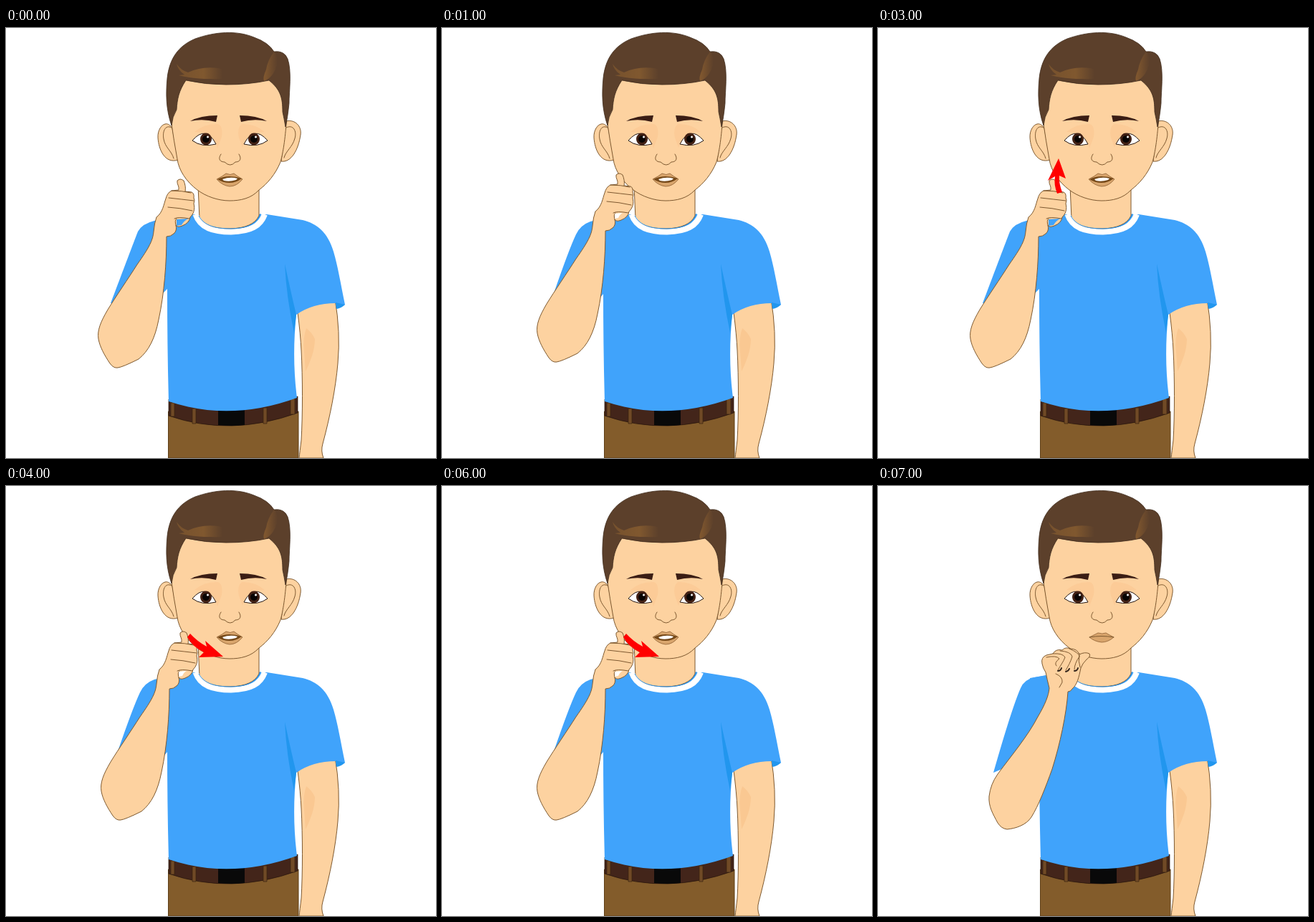
Animation, 600 px wide and 600 px high, one loop 8 s. Source, as an HTML page:

```html
<!DOCTYPE html>
<html lang="en">
<head>
<meta charset="utf-8">
<title>Sign gesture</title>
<style>
html, body { margin: 0; width: 100%; height: 100%; overflow: hidden; background: #fff; }
svg { display: block; width: 100vw; height: 100vh; }
.skin { fill: #fdd2a0; stroke: #7d5930; stroke-width: 1; stroke-linejoin: round; }
.line { fill: none; stroke: #7d5930; stroke-width: 1; stroke-linecap: round; }
.shirt { fill: #40a3fb; }
.shade { fill: #2196ee; }
.lip { fill: #d9a56c; stroke: #8d5f31; stroke-width: .8; }
.mark { fill: #f00; font: 19px "Noto Sans", "Open Sans", sans-serif; text-anchor: middle; }
.step { opacity: 0; animation: 8s step-end infinite; }
.high { animation-name: high; }
.mid { animation-name: mid; }
.chin { animation-name: chin; }
.one { animation-name: one; }
.up { animation-name: up; }
.back { animation-name: back; }
.two { animation-name: two; }
@keyframes high { 0%, 37.5% { opacity: 1 } 12.5%, 50%, 100% { opacity: 0 } }
@keyframes mid { 12.5%, 50%, 75% { opacity: 1 } 0%, 25%, 62.5%, 87.5%, 100% { opacity: 0 } }
@keyframes chin { 25%, 62.5%, 87.5%, 100% { opacity: 1 } 0%, 37.5%, 75% { opacity: 0 } }
@keyframes one { 25% { opacity: 1 } 0%, 37.5%, 100% { opacity: 0 } }
@keyframes up { 37.5% { opacity: 1 } 0%, 50%, 100% { opacity: 0 } }
@keyframes back { 50%, 75% { opacity: 1 } 0%, 62.5%, 87.5%, 100% { opacity: 0 } }
@keyframes two { 62.5% { opacity: 1 } 0%, 75%, 100% { opacity: 0 } }
</style>
</head>
<body>
<svg viewBox="0 0 600 600">
  <defs>
    <linearGradient id="shine" x1="0" x2="1">
      <stop offset="0" stop-color="#83592f"/><stop offset="1" stop-color="#5c402b"/>
    </linearGradient>
    <linearGradient id="tuft" x1="0" x2="1">
      <stop offset="0" stop-color="#76512d"/><stop offset=".35" stop-color="#80582f"/><stop offset=".6" stop-color="#5c402b"/>
    </linearGradient>

    <g id="openMouth">
      <path class="lip" d="M294 211Q302 207 307 203Q313 206 318 203Q323 207 330 211Q322 221 312 221Q302 220 294 211Z"/>
      <path fill="#754919" d="M295 211Q303 207 312 207Q321 207 329 210Q321 216 312 216Q302 216 295 211Z"/>
      <path fill="#fff" d="M302 211Q313 207 323 210L321 212Q312 215 304 213Z"/>
    </g>

    <g id="raisedArm">
      <path class="skin" d="M210 264C219 257 220 246 223 238Q225 230 231 227L241 226C242 220 238 218 239 213Q243 209 248 213C250 218 251 223 250 228L259 229Q263 231 262 237Q264 240 262 245C264 253 262 259 257 264Q256 272 246 276Q239 279 237 275Q239 283 234 287Q230 291 224 291C224 327 221 370 213 407C208 433 199 451 185 462Q163 473 156 474Q150 475 145 468C137 456 131 445 129 434C127 422 132 410 142 393C153 375 171 349 183 330C200 306 205 296 206 284Q207 272 210 264Z"/>
      <path class="line" d="M231 227Q246 227 258 230M227 237Q245 239 262 241M226 250Q243 251 260 255M235 266Q240 263 256 266M237 275Q235 268 238 266"/>
    </g>

    <g id="eye">
      <path id="eyeWhite" fill="#fff" stroke="#25150e" d="M260 157Q279 135 293 162Q273 167 260 157Z"/>
      <ellipse cx="279" cy="155" rx="8" ry="8.500" fill="#412014"/>
      <circle cx="279" cy="155" r="5" fill="#080404"/>
    </g>
  </defs>

  <rect width="600" height="600" fill="#fff"/>

  <!-- Trousers and belt -->
  <path fill="#835c2b" stroke="#604018" d="M226.500 535H408V600H226.500Z"/>
  <path fill="#43251a" stroke="#25130b" stroke-width=".7" d="M227 518Q313 549 407 514V537Q313 571 227 541Z"/>
  <path fill="#090909" d="M296 532H333V554Q314 556 296 554Z"/>
  <g fill="#704a26" stroke="#3b2411" stroke-width=".7">
    <path d="M230 523h5v19h-5ZM260 531h5v21h-5ZM359 530h5v22h-5ZM397 517h6v22h-6Z"/>
  </g>

  <!-- Resting arm -->
  <path class="skin" d="M407 385V397Q411 428 412 450C414 488 414 540 412 575Q410 592 409 600H443Q439 590 442 580C452 543 460 503 463 468Q467 424 459 378Z"/>
  <path fill="#fac892" d="M419 419Q427 425 431 434C431 449 425 465 418 479Q417 465 416 452Q414 432 419 419Z"/>

  <!-- Shirt -->
  <path class="shirt" d="M262 260L212 268L218 300V371L225 364Q225 450 227 521Q313 550 406 516C401 478 401 438 405 400Q428 384 460 384L461 391L473 386C467 357 463 332 457 312C449 285 434 273 414 268L364 260Z"/>
  <path class="shade" d="M389 329Q391 374 402 425L405 400Q396 362 389 329ZM460 383L473 386Q468 391 461 392Z"/>

  <!-- Neck and collar -->
  <path class="skin" d="M268 220L270 266Q279 280 313 280Q345 279 353 262V218Z"/>
  <path fill="none" stroke="#fff" stroke-width="8" d="M264.500 260C271 279 289 284.500 314 284.500C342 284 355 276 361 260"/>
  <path fill="none" stroke="#2b91e5" d="M269 262C276 276 293 280 313 280C337 280 350 273 355 259"/>

  <!-- Head -->
  <path class="skin" d="M232 140C224 126 211 138 212 153C213 170 222 190 240 184Z"/>
  <path class="line" d="M231 139C222 134 218 145 220 155C222 167 231 171 234 182"/>
  <path class="skin" d="M391 130C403 127 413 137 411 149C408 170 398 188 384 186Z"/>
  <path class="line" d="M391 139C401 134 406 144 403 154C400 166 390 172 388 181"/>
  <path class="skin" d="M231 134L237 90L260 60H370L389 90L391 134C389 160 386 176 383 187C376 204 365 217 353 226C342 238 327 241 312 241C296 241 279 235 267 226C251 214 241 198 239 183Q234 156 231 134Z"/>
  <path fill="#5c402b" stroke="#3f2b1c" stroke-width=".8" d="M231 136C223 113 223 91 225 70C228 43 240 25 264 15C292 5 322 3 346 13Q366 20 374 33Q388 31 393 43C399 61 395 88 395 105Q393 125 390 138Q388 126 386 117C386 97 383 86 367 73Q339 79 307 79Q278 79 251 73C241 88 239 99 238 114Q232 124 231 136Z"/>
  <path fill="url(#tuft)" d="M238 50Q244 59 254 62Q273 53 296 56Q317 62 345 61Q318 73 286 71Q260 71 241 66L249 65Q240 59 238 50Z"/>
  <path fill="url(#shine)" d="M374 33Q365 45 363 58Q358 69 360 74Q373 69 378 52Q381 40 374 33Z"/>
  <path fill="#fcc792" opacity=".6" d="M263 145Q277 133 296 134Q303 137 301 152L295 168Q293 155 279 146ZM361 145Q347 133 329 134Q322 139 325 153L330 167Q333 153 347 146Z"/>
  <path fill="#3a1d14" d="M257 130Q271 122 295 122L293 131Q275 126 257 130ZM326 122Q350 122 364 130Q346 126 328 131Z"/>

  <use href="#eye"/>
  <use href="#eye" transform="matrix(-1 0 0 1 625 0)"/>
  <path fill="#fff" d="M280 152a1.500 1.500 0 1 0 3 0a1.500 1.500 0 1 0 -3 0M347 152a1.500 1.500 0 1 0 3 0a1.500 1.500 0 1 0 -3 0"/>
  <path class="line" d="M300 176C295 183 299 187 305 187Q313 195 320 187C327 187 329 182 325 176"/>

  <!-- Hand poses -->
  <g class="step high">
    <use href="#openMouth"/>
    <path class="shirt" d="M228 265L207 269Q190 273 184 284Q177 302 146 384L160 385L220 300Z"/>
    <use href="#raisedArm"/>
    <path class="shirt" d="M238 267L255 266Q249 268 245 275L238 276Z"/>
  </g>
  <g class="step mid">
    <use href="#openMouth"/>
    <path class="shirt" d="M228 265L207 270Q193 275 187 288Q177 309 155 373L166 376L222 300ZM218 360H226V370L219 378Z"/>
    <use href="#raisedArm" x="4" y="-8"/>
    <path fill="#fff" d="M241 259L252 258Q248 260 246 265L241 266Z"/>
  </g>
  <g class="step chin">
    <path class="lip" d="M295 211Q303 207 307 205Q313 207 318 205Q323 208 329 211Q321 218 312 218Q302 217 295 211Z"/>
    <path class="line" d="M295 211Q312 208 329 211"/>
    <path class="shirt" d="M240 263L218 267Q204 270 199 282Q187 309 161 400L175 394L225 330L240 285Z"/>
    <path class="skin" d="M229 248Q227 239 235 236L244 234Q248 227 257 229Q262 224 268 227Q278 227 281 235Q289 231 295 234Q297 238 291 242Q285 248 283 254C280 268 278 277 271 283Q269 287 265 287C263 318 254 360 243 395C234 420 224 446 214 462C207 473 192 478 180 479Q172 478 167 470C160 457 154 447 155 433Q157 416 167 402C187 375 209 349 223 322C233 305 238 293 239 282Q236 270 234 260Q230 254 229 248Z"/>
    <path class="line" d="M235 239Q249 236 253 241Q245 247 249 251M244 234Q258 233 261 239C259 245 254 251 251 257M254 230Q269 231 271 238C269 245 265 252 262 257M267 227Q281 233 281 238Q274 248 274 256M281 236Q279 244 282 253M248 262Q258 266 257 274L253 281"/>
    <path fill="none" stroke="#33251c" stroke-width="2" stroke-linecap="round" d="M251 258Q255 258 256 254M262 259Q266 258 267 255M274 258Q278 258 279 254"/>
  </g>

  <!-- Direction cues -->
  <g class="mark">
    <g class="step one">
      <path d="M238 208L270 215L260 222Q270 234 285 243L282 249Q265 242 254 230L246 239Z"/>
      <text x="308" y="235">1</text>
    </g>
    <path class="step up" d="M252 182L262 210L253 206Q252 216 257 229L250 231Q245 218 247 207L237 213Z"/>
    <path class="step back" d="M257 206Q267 217 280 224L278 216L303 238L269 239L276 232Q261 225 253 211Z"/>
    <text class="step two" x="312" y="236">2</text>
  </g>
</svg>
</body>
</html>
```
